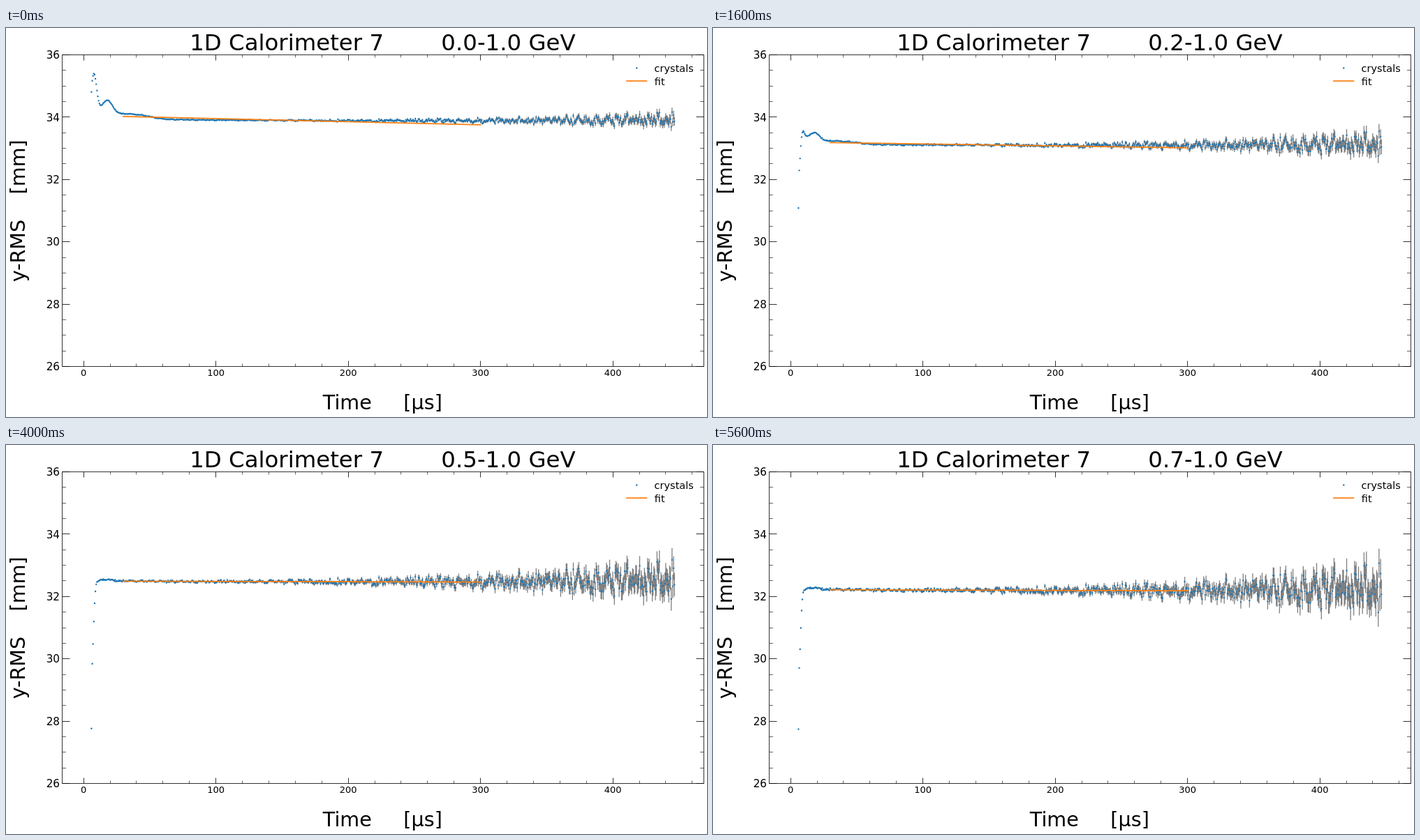
Recreate the animation shown at these times as an HTML page. Size 1004 px wide and 558 px high, loop 6400 ms.

```html
<!DOCTYPE html>
<html lang="en">
<head>
<meta charset="utf-8">
<title>y-RMS over time by energy range</title>
<style>
html, body { margin: 0; width: 100%; height: 100%; overflow: hidden; background: #fff; }
svg { display: block; width: 100%; height: 100%; }
text { font-family: "DejaVu Sans", sans-serif; fill: #000; white-space: pre; }
path { fill: none; }
.dot { stroke: #1f77b4; stroke-width: 2.4; stroke-linecap: round; }
.fit { stroke: #ff7f0e; stroke-width: 1.7; stroke-linecap: square; }
</style>
</head>
<body>
<svg viewBox="0 0 1004 558">
  <path id="bars" stroke="#808080" stroke-width="1.3"/>
  <path id="dots" class="dot"/>
  <path id="fit" class="fit"/>
  <path id="major" stroke="#000" stroke-width="0.8"/>
  <path id="minor" stroke="#000" stroke-width="0.6"/>
  <path class="dot" d="M903.3 57.5h.01"/>
  <path class="fit" d="M889 76H917.5"/>
  <g id="labels"></g>
</svg>
<script>
const STEP = 800, COUNT = 739;
const LEFT = 80.5, RIGHT = 999.5, TOP = 38.5, BOTTOM = 485.5;
const MM = 44.7, US = 1.895, T0 = 5.97, DT = 0.597;
const $ = id => document.getElementById(id);
const timeAt = i => T0 + DT * i;
const xAt = t => 111.1 + US * t;
const yAt = mm => TOP + (36 - mm) * MM;
const snap = v => Math.floor(v) + 0.5;
const fix = v => v.toFixed(2);
const bell = (i, mid, width) => Math.exp(-(((i - mid) / width) ** 2));

// Settled height, depth of the first reading, early bump and shelf, all in px
const series = [
  { level: 133, drop: 20, bump: 62, shelf: 9.7 },
  { level: 149, drop: 30, bump: 80, shelf: 14.5 },
  { level: 168.2, drop: 117, bump: 24, shelf: 6 },
  { level: 178.5, drop: 203, bump: 0, shelf: 2 },
  { level: 188.8, drop: 215, bump: 0, shelf: 1 },
  { level: 196, drop: 213, bump: 0, shelf: 1 },
  { level: 203, drop: 207, bump: 0, shelf: 1 },
  { level: 208.4, drop: 202, bump: 0, shelf: 1.2 }
];

// Height of sample i without noise
function curve(s, i) {
  const rise = 0.6 * bell(i, 0, 3.4) + 0.4 * bell(i, 0, 0.5);
  const shelf = 0.75 / (1 + Math.exp((i - 74) / 8)) + 0.4 * Math.exp(-i / 120);
  const drift = 1.2 * Math.max(0, (i - 380) / 360) ** 2;
  return s.level + s.drop * rise - s.bump * bell(i, 2.5, 5.3)
    - s.shelf * (shelf + 1.95 * bell(i, 20, 9)) - drift;
}

// Straight line through 30-300 µs, weighted by the inverse squared error
function fitLine(s) {
  let w = 0, wt = 0, wy = 0, wtt = 0, wty = 0;
  for (let i = 0; i < COUNT; i++) {
    const t = timeAt(i);
    if (t < 30 || t > 300) continue;
    const k = Math.exp(-t / 64.4), y = curve(s, i);
    w += k; wt += k * t; wy += k * y; wtt += k * t * t; wty += k * t * y;
  }
  const slope = (w * wty - wt * wy) / (w * wtt - wt * wt);
  const base = (wy - slope * wt) / w;
  const point = t => `${fix(xAt(t))} ${fix(base + slope * t)}`;
  return `M${point(30)}L${point(300)}`;
}

let seed = 20;
function rand() {
  seed = (seed * 1664525 + 1013904223) % 4294967296;
  return (seed + 0.5) / 4294967296;
}
const gauss = () => Math.sqrt(-2 * Math.log(rand())) * Math.cos(2 * Math.PI * rand());

// All ranges share the same scatter, in units of the error
const noise = Array.from({ length: COUNT }, (_, i) => {
  const beat = Math.cos(2 * Math.PI * (timeAt(i) - 418.5) / 7.5);
  return Math.max(-1.8, Math.min(1.8, 0.8 * gauss() + 0.6 * beat));
});

series.forEach((s, n) => {
  const maxErr = (0.14 + 0.047 * n) * MM;
  s.bars = s.dots = "";
  for (let i = 0; i < COUNT; i++) {
    const t = timeAt(i), x = fix(xAt(t));
    const err = maxErr * Math.exp((t - 445) / 135);
    const y = curve(s, i) - err * noise[i];
    s.bars += `M${x} ${fix(y - err)}V${fix(y + err)}`;
    s.dots += `M${x} ${fix(y)}h.01`;
  }
  s.line = fitLine(s);
});

function label(str, x, y, size, anchor = "middle", turn = 0) {
  const el = document.createElementNS("http://www.w3.org/2000/svg", "text");
  el.setAttribute("transform", `translate(${x} ${y}) rotate(${turn})`);
  el.setAttribute("font-size", size);
  el.setAttribute("text-anchor", anchor);
  el.textContent = str;
  $("labels").append(el);
  return el;
}

function drawAxes() {
  const lines = { major: `M${LEFT} ${TOP}H${RIGHT}V${BOTTOM}H${LEFT}Z`, minor: "" };
  for (let t = 0; t <= 460; t += 20) {
    const major = t % 100 === 0, len = major ? 8 : 4, x = snap(xAt(t));
    lines[major ? "major" : "minor"] += `M${x} ${TOP}v${len}M${x} ${BOTTOM}v${-len}`;
    if (major) label(t, xAt(t), 498.5, 13);
  }
  for (let mm = 26; mm <= 36; mm += 0.5) {
    const major = mm % 2 === 0, len = major ? 11 : 5.5, y = snap(yAt(mm));
    lines[major ? "major" : "minor"] += `M${LEFT} ${y}h${len}M${RIGHT} ${y}h${-len}`;
    if (major) label(mm, 77, yAt(mm) + 5.6, 15.2, "end");
  }
  for (const id in lines) $(id).setAttribute("d", lines[id]);
}

drawAxes();
label("Time     [µs]", 539.3, 547, 28.64);
label("y-RMS    [mm]", 27, 262.3, 28.64, "middle", -90);
label("crystals", 928.6, 62.5, 14.5, "start");
label("fit", 928.8, 82, 14.5, "start");
const title = label("", 539.4, 31.5, 32.4);

let shown = -1;
function draw(ms) {
  const n = Math.floor(ms / STEP) % series.length;
  if (n === shown) return;
  shown = n;
  const s = series[n];
  $("bars").setAttribute("d", s.bars);
  $("dots").setAttribute("d", s.dots);
  $("fit").setAttribute("d", s.line);
  title.textContent = `1D Calorimeter 7        0.${n}-1.0 GeV`;
}

const start = performance.now();
function tick() {
  draw(performance.now() - start);
  requestAnimationFrame(tick);
}
tick();
</script>
</body>
</html>
```
